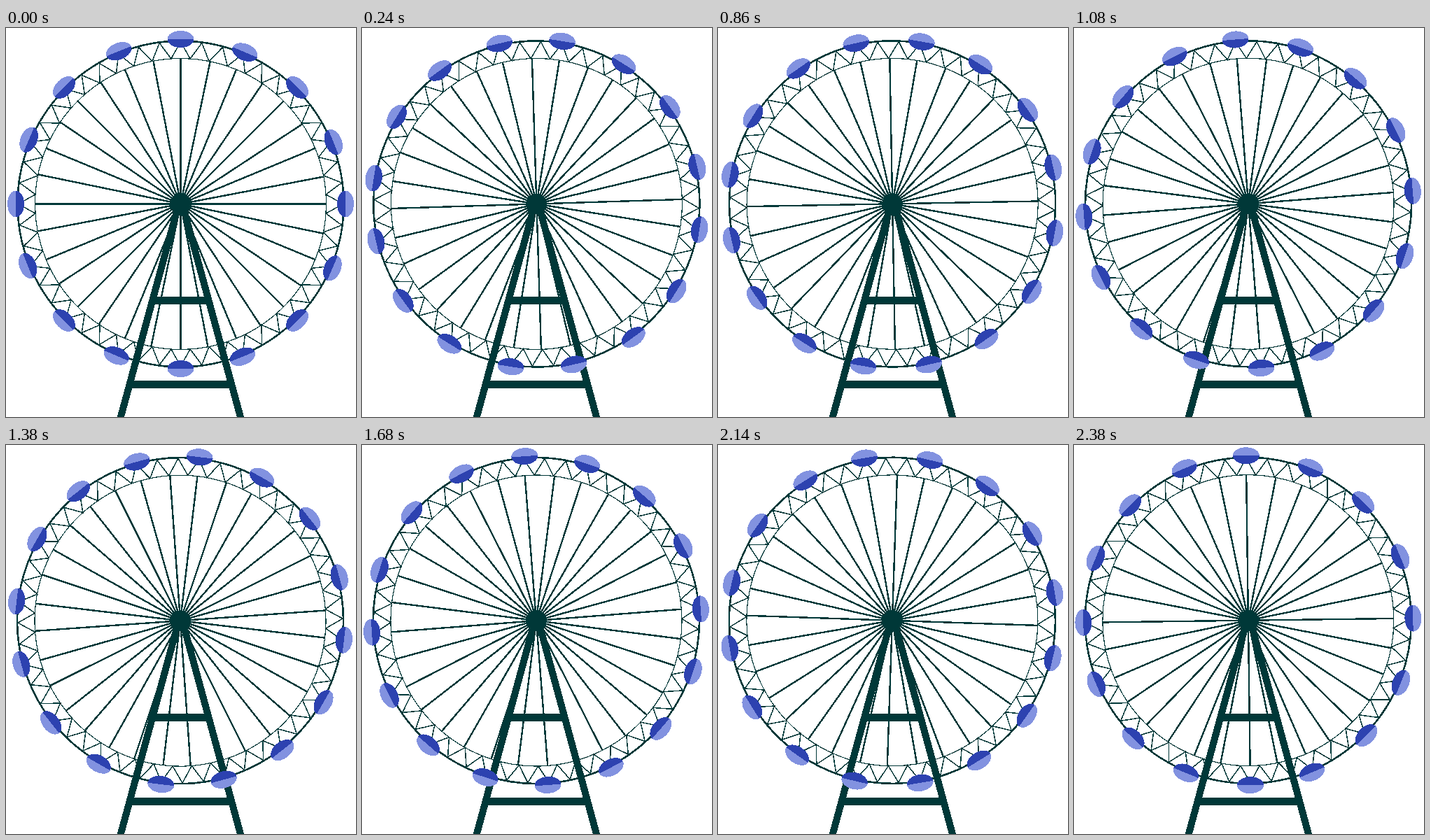
Write an HTML page that moves like this. It is 500 px wide and 556 px high and loops after 2400 ms.

```html
<!DOCTYPE html>
<html>
<head>
<meta charset="utf-8">
<title>Ferris wheel</title>
<style>
  html, body { margin: 0; height: 100%; overflow: hidden; background: #fff; }
  svg { display: block; shape-rendering: crispEdges; }
  .steel { fill: none; stroke: #003838; }
</style>
</head>
<body>
<svg width="500" height="556" viewBox="0 0 500 556">
  <g class="steel" stroke-width="10">
    <path d="M247 251L162.2 562M251.8 251L336.6 562"/>
    <path d="M208 389.5H290M176 509.5H322" stroke-width="11"/>
  </g>
  <g id="wheel"></g>
</svg>
<script>
const LOOP = 2400, STEP = 20, TURN = 90;
const RIM = 233, INNER = 208, CABIN = 235.5;
const wheel = document.getElementById('wheel');

// Point at a clockwise angle from the top, relative to the hub.
const polar = (radius, degrees) => {
  const a = degrees * Math.PI / 180;
  return `${(radius * Math.sin(a)).toFixed(2)} ${(-radius * Math.cos(a)).toFixed(2)}`;
};
const repeat = (count, part) => Array.from({ length: count }, (_, i) => part(i)).join('');
// Every second spoke and cabin is set slightly ahead of even spacing.
const spaced = (i, count) => i * 360 / count + (i % 2) * 0.45;

const spokes = repeat(32, i => `M0 0L${polar(INNER, spaced(i, 32))}`);
const truss = 'M' + repeat(96, i => polar(i % 2 ? INNER : RIM - 1, i * 3.75) + ' ') + 'Z';
const cabins = repeat(16, i => `
  <g transform="rotate(${spaced(i, 16)}) translate(0 ${-CABIN})">
    <ellipse rx="19" ry="12" fill="#8292e0"/>
    <path d="M-19 0A19 12 0 0 0 19 0Z" fill="#2d42b0"/>
  </g>`);

wheel.innerHTML = `
  <g class="steel">
    <circle r="${RIM}" stroke-width="2.6"/>
    <circle r="${INNER}" stroke-width="1.2"/>
    <path d="${truss}" stroke-width="1.5"/>
    <path d="${spokes}" stroke-width="2.4"/>
    <circle r="15" style="fill:#003838;stroke:none"/>
  </g>${cabins}`;

function draw() {
  const time = Math.floor(performance.now() % LOOP / STEP) * STEP;
  const angle = time / LOOP * TURN;
  // The hub sits slightly off the pivot.
  wheel.setAttribute('transform', `translate(249.6 250.8) rotate(${angle}) translate(-.1 .7)`);
  requestAnimationFrame(draw);
}
draw();
</script>
</body>
</html>
```
